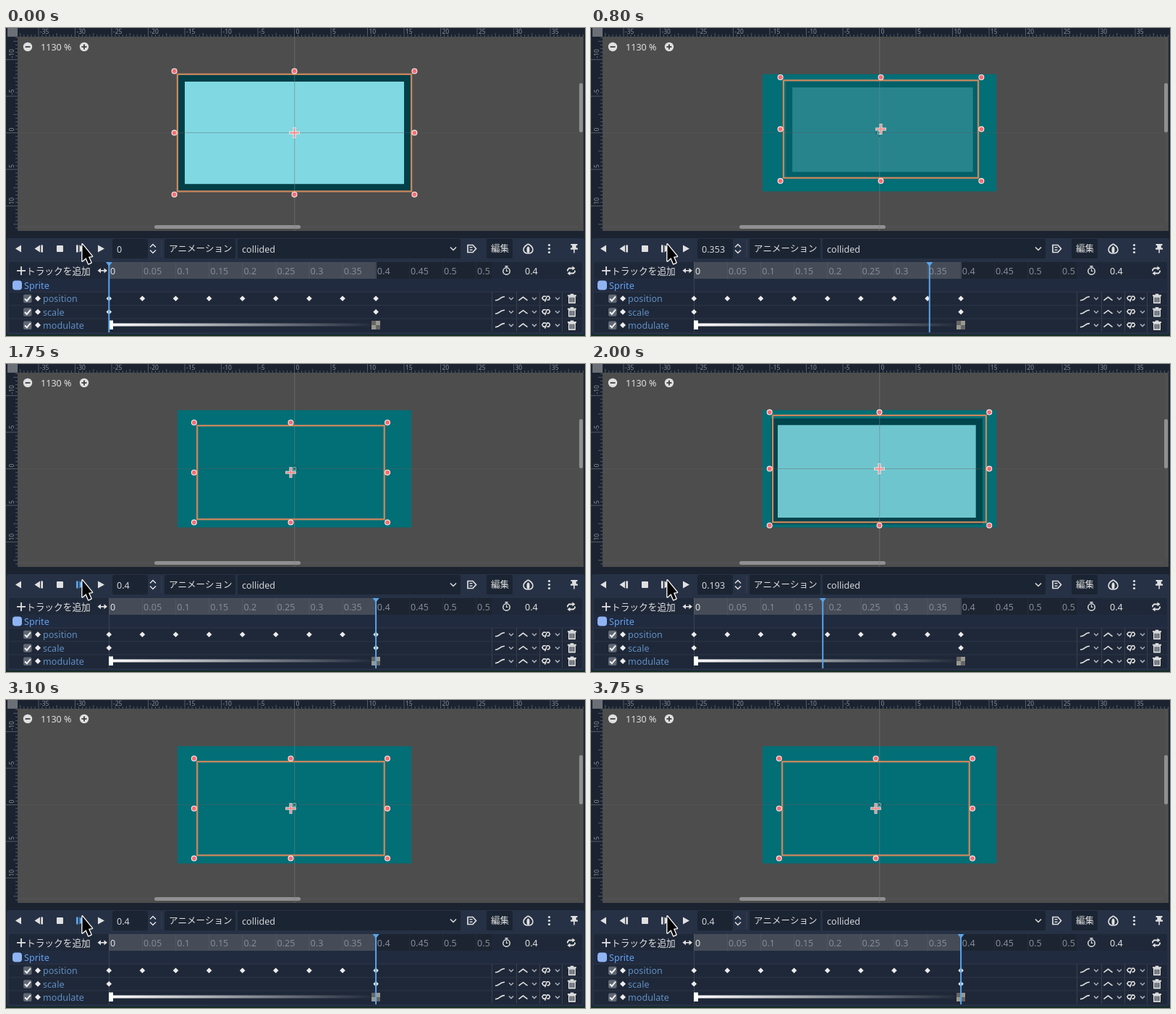
An HTML page with a canvas for the animation above (3.8 s loop, 800 px wide and 425 px high).

```html
<!DOCTYPE html>
<html lang="ja">
<head>
<meta charset="utf-8">
<title>Animation panel</title>
<style>
html, body { margin: 0; width: 100%; height: 100%; overflow: hidden; background: #1b2330; }
canvas { display: block; width: 800px; height: 425px; }
</style>
</head>
<body>
<canvas id="stage" width="800" height="425"></canvas>
<script>
const g = document.getElementById('stage').getContext('2d');
const LOOP = 3800, STEP = 50, LENGTH = 0.4, LAG = 0.018;
const UNIT = 10.1, CX = 398.5, CY = 144.6;
const KEY0 = 142, KEY_GAP = 46.1;
const LIGHT = '#e0e0e0', BLUE = '#5aa5ec', FIELD = '#1b2432';
const FONT = '"Noto Sans", "Noto Sans CJK JP", sans-serif';
const CJK = '"Noto Sans CJK JP", "Noto Sans CJK", sans-serif';

// Each run: button pressed, rewound to zero, clock start (ms).
const RUNS = [
  { press: 250, rewind: 440, start: 447 },
  { press: 1700, rewind: 1790, start: 1807 },
  { press: 2850, rewind: 3140, start: 3160 }
];
// Shake offsets, repeated every four keys after the first.
const SHAKE = [[0.5, 0.5], [-0.5, -0.5], [0.5, -0.5], [-0.5, 0.5]];

const clamp = (v, a, b) => Math.min(b, Math.max(a, v));
const mix = (a, b, k) => a + (b - a) * k;

function rect(x, y, w, h, fill, r = 0) {
  g.fillStyle = fill;
  g.beginPath();
  g.roundRect(x, y, w, h, r);
  g.fill();
}
function poly(points, fill) {
  g.fillStyle = fill;
  g.beginPath();
  points.forEach(([x, y]) => g.lineTo(x, y));
  g.closePath();
  g.fill();
}
function line(points, color, width = 1.5) {
  g.strokeStyle = color;
  g.lineWidth = width;
  g.beginPath();
  points.forEach(([x, y]) => g.lineTo(x, y));
  g.stroke();
}
function dot(x, y, r, fill) {
  g.fillStyle = fill;
  g.beginPath();
  g.arc(x, y, r, 0, 7);
  g.fill();
}
function ring(x, y, r, color, width = 1.5, from = 0, to = Math.PI * 2) {
  g.strokeStyle = color;
  g.lineWidth = width;
  g.beginPath();
  g.arc(x, y, r, from, to);
  g.stroke();
}
function text(s, x, y, color = LIGHT, size = 12.6, family = FONT) {
  g.font = `${size}px ${family}`;
  g.fillStyle = color;
  g.fillText(s, x, y);
}
const diamond = (x, y, r) => poly([[x - r, y], [x, y - r], [x + r, y], [x, y + r]], '#ececec');
const chevron = (x, y, w = 3, h = 1.5, color = '#a9aeb7') =>
  line([[x - w, y - h], [x, y + h], [x + w, y - h]], color, 1.5);

function pose(ms) {
  const run = RUNS.filter(r => ms >= r.rewind).pop();
  const pressed = RUNS.some(r => ms >= r.press && ms < r.rewind);
  const clock = run ? Math.max(0, (ms - run.start) / 1000) : 0;
  // The selection frame trails the sprite by about one redraw.
  return { time: Math.min(clock, LENGTH), seen: clamp(clock - LAG, 0, LENGTH), pressed };
}

function offsetAt(t) {
  const key = i => i ? SHAKE[(i - 1) % 4] : [0, 0];
  const p = t / 0.05 + 1e-9, i = Math.min(7, Math.floor(p));
  return [0, 1].map(n => mix(key(i)[n], key(i + 1)[n], p - i) * UNIT);
}

function boxAt(t) {
  const [dx, dy] = offsetAt(t), s = 1 - 0.2 * t / LENGTH;
  return { x: CX + dx, y: CY + dy, w: 16 * UNIT * s, h: 8 * UNIT * s, edge: UNIT * s };
}

function centered(x, y, w, h, fill) {
  rect(x - w, y - h, 2 * w, 2 * h, fill);
}

function cross(x, y, r, w, fill) {
  centered(x, y, r, w / 2, fill);
  centered(x, y, w / 2, r, fill);
}

function drawSprite(t) {
  const { x, y, w, h, edge } = boxAt(t);
  centered(CX, CY, 16 * UNIT, 8 * UNIT, '#026e76');
  g.globalAlpha = 1 - (t / LENGTH) ** 2.8;
  centered(x, y, w, h, '#023f47');
  centered(x, y, w - edge, h - edge, '#80d8e2');
  g.globalAlpha = 1;
}

function drawSelection(t) {
  const { x, y, w, h } = boxAt(t);
  rect(CX - 0.25, 12, 1, 268, 'rgba(122,126,126,.6)');
  rect(16, CY - 0.5, 776, 1, 'rgba(90,92,92,.4)');

  g.strokeStyle = '#c8875e';
  g.lineWidth = 2.3;
  g.strokeRect(x - w, y - h, 2 * w, 2 * h);

  ring(CX, CY, 2.4, 'rgba(225,230,230,.55)', 1);
  [[0, -1], [1, 0], [0, 1], [-1, 0]].forEach(([a, b]) =>
    dot(CX + a * 4.5, CY + b * 4.5, 1, 'rgba(30,50,54,.6)'));
  cross(x, y, 7.5, 4.2, 'rgba(255,240,238,.75)');
  cross(x, y, 6.5, 1.8, '#f08a88');

  for (let i = -1; i <= 1; i++) for (let j = -1; j <= 1; j++) {
    if (!i && !j) continue;
    const hx = x + i * (w + 4.3), hy = y + j * (h + 4.3);
    dot(hx, hy, 4, '#fbeeee');
    dot(hx, hy, 2.9, '#f66d72');
  }
}

function drawRulers() {
  rect(0, 0, 800, 12, '#1b2330');
  rect(0, 0, 16, 280, '#1b2330');
  const mark = '#545b66', label = '#8b9099';
  for (let i = -75; i <= 79; i++) {
    const x = CX + i * UNIT / 2, major = i % 10 === 0;
    const top = major ? 0 : i % 5 ? 9 : 7;
    rect(x - 0.5, top, 1, 12 - top, mark);
    if (major) text(String(i / 2), x + 2, 8, label, 8.5);
  }
  for (let i = -26; i <= 26; i++) {
    const y = CY + i * UNIT / 2, major = i % 10 === 0;
    const left = major ? 0 : i % 5 ? 13 : 10;
    rect(left, y - 0.5, 16 - left, 1, mark);
    if (!major) continue;
    g.save();
    g.translate(11, y - 2);
    g.rotate(-Math.PI / 2);
    text(String(i / 2), 0, 0, label, 8.5);
    g.restore();
  }
  rect(2, 0, 14, 12, '#6b7078');
}

function drawViewport(time, seen) {
  rect(0, 0, 800, 425, '#1b2330');
  rect(16, 12, 782, 268, '#4d4d4d');
  drawRulers();
  rect(16, 273.5, 774, 2, '#535353');
  rect(793.5, 13, 2, 255, '#535353');
  rect(205, 272, 202, 5, '#909090', 2.5);
  rect(792, 76, 5, 68, '#909090', 2.5);
  drawSprite(time);
  drawSelection(seen);
  [30, 108].forEach((x, i) => {
    dot(x, 26, 6.2, LIGHT);
    rect(x - 3.5, 25.1, 7, 1.8, '#3f3f3f');
    if (i) rect(x - 0.9, 22.5, 1.8, 7, '#3f3f3f');
  });
  text('1130 %', 48, 30.5);
}

function drawToolbar(time, pressed) {
  const y = 304.5;
  rect(1, 290, 798, 133, '#263145', 3);
  [[147, 49], [219, 98], [320, 308], [664, 36]].forEach(([x, w]) => rect(x, 291, w, 27, FIELD, 2));
  rect(214.5, 293, 1, 23, '#38414f');

  poly([[13, y], [21, y - 5], [21, y + 5]], LIGHT);
  poly([[39.5, y], [47, y - 5], [47, y + 5]], LIGHT);
  rect(48.3, y - 5, 2.7, 10, LIGHT);
  rect(70, y - 4.5, 9, 9, LIGHT, 1);
  const play = pressed ? BLUE : LIGHT;
  rect(97, y - 5, 2.7, 10, play);
  poly([[101.5, y - 5], [109, y], [101.5, y + 5]], play);
  poly([[127, y - 5], [136, y], [127, y + 5]], LIGHT);

  text(String(+time.toFixed(3)), 153, 309.5, '#d2d4d8');
  chevron(203, 300.5, 4, -2, LIGHT);
  chevron(203, 308.5, 4, 2, LIGHT);
  text('アニメーション', 225, 309, LIGHT, 12.5, CJK);
  text('collided', 326, 309.5, '#d2d4d8');
  chevron(618, 304.5, 4, 2, LIGHT);

  line([[638, 299.5], [645, 299.5], [649.5, 304.5], [645, 309.5], [638, 309.5], [638, 298.7]], LIGHT, 1.7);
  rect(640.5, 302, 4, 1.4, LIGHT);
  rect(640.5, 305.5, 4, 1.4, LIGHT);
  text('編集', 670, 309, LIGHT, 12.5, CJK);

  g.strokeStyle = LIGHT;
  g.lineWidth = 1.6;
  g.beginPath();
  g.moveTo(721.5, 298);
  g.bezierCurveTo(732, 304, 728, 311, 721.5, 311);
  g.bezierCurveTo(715, 311, 711, 304, 721.5, 298);
  g.stroke();
  g.beginPath();
  g.ellipse(721.5, 306, 2, 4.5, 0, 0, 7);
  g.fillStyle = LIGHT;
  g.fill();
  [-5, 0, 5].forEach(d => dot(750.5, y + d, 1.6, LIGHT));
  rect(780.5, 298, 9, 2, LIGHT);
  rect(782.2, 300, 5.6, 4, LIGHT);
  rect(780, 303.5, 10, 2.2, LIGHT);
  rect(784.2, 305, 1.6, 5.5, LIGHT);
}

function loopIcon(x, y) {
  line([[x - 5, y + 0.5], [x - 5, y - 1.5], [x - 3, y - 3.5], [x + 2, y - 3.5]], LIGHT, 1.8);
  line([[x + 5, y - 0.5], [x + 5, y + 1.5], [x + 3, y + 3.5], [x - 2, y + 3.5]], LIGHT, 1.8);
  poly([[x + 1.5, y - 6.5], [x + 5.5, y - 3.5], [x + 1.5, y - 0.5]], LIGHT);
  poly([[x - 1.5, y + 6.5], [x - 5.5, y + 3.5], [x - 1.5, y + 0.5]], LIGHT);
}

function trackControls(y) {
  [671, 705, 737, 768].forEach(x => rect(x, y - 9, 1, 18, '#39414f'));
  [698, 730, 762].forEach(x => chevron(x, y));
  g.strokeStyle = LIGHT;
  g.lineWidth = 1.6;
  g.beginPath();
  g.moveTo(676, y + 2.5);
  g.bezierCurveTo(683, y + 3, 681, y - 2.5, 689, y - 2.5);
  g.stroke();
  line([[708.5, y + 2.5], [714.5, y - 2], [720.5, y + 2.5]], LIGHT, 1.6);
  line([[746, y - 3], [742.5, y - 3], [740.8, y - 0.5], [742.5, y + 2], [745.5, y + 2]], LIGHT, 1.6);
  line([[744.5, y + 4.5], [747.5, y - 3], [750, y - 3], [751.5, y - 0.5], [750, y + 2], [747.5, y + 2]], LIGHT, 1.6);
  rect(776, y - 5, 12, 2, LIGHT);
  rect(779.7, y - 6.5, 4.6, 2, LIGHT);
  g.strokeStyle = LIGHT;
  g.lineWidth = 1.7;
  g.strokeRect(777.9, y - 2.3, 8.2, 8.3);
  [780.7, 783.3].forEach(x => rect(x - 0.6, y - 1.5, 1.2, 7, LIGHT));
}

function drawTrack(name, y) {
  rect(4, y - 9.5, 792, 1, '#2d3747');
  rect(24, y - 5.5, 11.5, 11.5, '#616874', 2);
  line([[26, y + 0.3], [28.8, y + 3.2], [34, y - 3]], '#f2f2f2', 2);
  diamond(44, y, 4);
  text(name, 51, y + 4.8, '#5f8fc4');
  trackControls(y);
}

function drawTimeline(time) {
  rect(4, 323, 792, 97, '#1f2838');
  const end = KEY0 + 8 * KEY_GAP;
  rect(KEY0, 323, end - KEY0, 23, '#454c58');
  rect(end, 323, 671 - end, 23, '#1c2431');
  rect(15, 334, 12, 1.8, LIGHT);
  rect(20.1, 329, 1.8, 12, LIGHT);
  text('トラックを追加', 28, 339.5, LIGHT, 12.7, CJK);
  rect(129, 334, 9, 1.6, LIGHT);
  poly([[126.5, 334.8], [131, 331.3], [131, 338.3]], LIGHT);
  poly([[140, 334.8], [135.5, 331.3], [135.5, 338.3]], LIGHT);

  g.save();
  g.beginPath();
  g.rect(KEY0, 323, 528, 23);
  g.clip();
  for (let i = 0; i < 12; i++) {
    const x = KEY0 + i * KEY_GAP;
    rect(x, 323, 1, 23, i > 8 ? '#252e3c' : '#505762');
    text(String(+(i * 0.05).toFixed(2)), x + 2, 339.5, i ? '#858b95' : LIGHT);
  }
  g.restore();

  ring(691.5, 335.5, 4.7, LIGHT, 1.5);
  rect(689.5, 328, 4, 1.6, LIGHT);
  line([[691.5, 332.5], [691.5, 335.5], [693.5, 335.5]], LIGHT, 1.2);
  text('0.4', 717, 339.5);
  loopIcon(781, 335);

  rect(4, 346, 792, 18, '#212b40');
  rect(9, 348.5, 13, 13, '#8fb4f4', 4);
  text('Sprite', 25, 359.8, '#64a2f0');

  ['position', 'scale', 'modulate'].forEach((name, i) => drawTrack(name, 373.3 + i * 18.4));
  rect(KEY0, 346, 1, 74, '#3a4352');
  for (let i = 0; i < 9; i++) diamond(KEY0 + i * KEY_GAP + 0.3, 373.3, 3.8);
  [0, 8].forEach(i => diamond(KEY0 + i * KEY_GAP + 0.3, 391.7, 3.8));

  const fade = g.createLinearGradient(145, 0, end, 0);
  fade.addColorStop(0, 'rgba(255,255,255,1)');
  fade.addColorStop(1, 'rgba(255,255,255,0)');
  rect(145, 407.5, end - 145, 4, fade);
  rect(142, 403.5, 6, 12.5, '#fff');
  for (let i = 0; i < 4; i++) {
    const col = i % 2, row = i >> 1;
    rect(505 + col * 6, 404 + row * 6, 6, 6, col === row ? '#666' : '#98988f');
  }

  const x = KEY0 + time / 0.05 * KEY_GAP + 0.3;
  rect(x - 1, 324, 2, 96, BLUE);
  poly([[x - 4.5, 323], [x + 4.5, 323], [x, 329]], BLUE);
  rect(0, 424, 800, 1, '#0c3516');
}

function drawPointer() {
  const shape = [[105.5, 298.5], [105.5, 321.5], [110.5, 317], [114, 325.3], [117.5, 323.8], [114, 315.7], [119, 315]];
  g.lineJoin = 'round';
  line([...shape, shape[0], shape[1]], '#fff', 2.6);
  poly(shape, '#050505');
  g.lineJoin = 'miter';
}

function frame() {
  const now = performance.now() % LOOP;
  const p = pose(Math.floor(now / STEP) * STEP);
  drawViewport(p.time, p.seen);
  drawToolbar(p.time, p.pressed);
  drawTimeline(p.time);
  drawPointer();
  requestAnimationFrame(frame);
}
frame();
</script>
</body>
</html>
```
